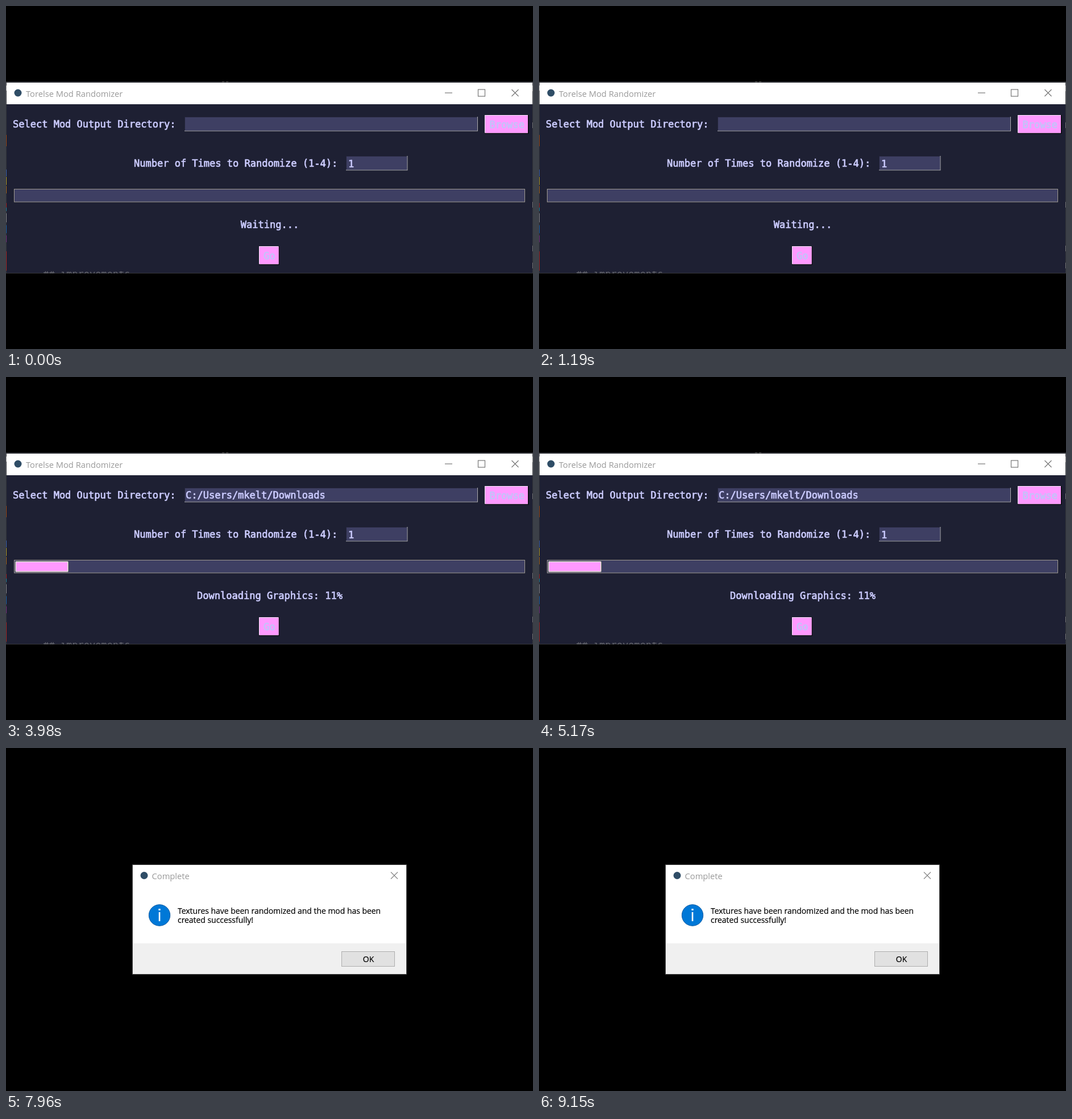
These frames come from a looping animation (927x604 px, 9.95 s). An HTML page:

```html
<!DOCTYPE html>
<html lang="en">
<head>
<meta charset="utf-8">
<title>Mod randomizer</title>
<style>
html, body { margin: 0; width: 100%; height: 100%; overflow: hidden; background: #000; }
svg { display: block; width: 927px; height: 604px; }
text { font-family: "Open Sans", "Noto Sans", sans-serif; font-size: 14.3px; white-space: pre; }
.scene { display: none; }
.title { font-size: 14.7px; fill: #999; }
.mono text { font-family: "DejaVu Sans Mono", monospace; font-size: 17px; fill: #ccccff; stroke: #ccccff; stroke-width: .7; }
.mono .label { fill: #c6c0fa; stroke: #c6c0fa; stroke-width: 1; }
.line { fill: none; stroke-width: 1.2; }
.white text { fill: #fff; stroke: #fff; stroke-width: .25; }
.white .dim { fill: #8e8e8e; stroke: none; }
.white .head { fill: #e4e4e4; stroke: none; }
.message text { font-size: 13.93px; fill: #000; stroke: #000; stroke-width: .2; }
.message .title { font-size: 14.7px; fill: #999; stroke: none; }
.mid { text-anchor: middle; }
</style>
</head>
<body>
<svg viewBox="0 0 927 604">
  <defs>
    <linearGradient id="sky" x2="1" y2="1">
      <stop stop-color="#1688dd"/><stop offset="1" stop-color="#4cc3ff"/>
    </linearGradient>
    <clipPath id="underMain"><rect x="60" y="467" width="180" height="4"/></clipPath>
    <clipPath id="underPicker"><rect x="65" y="602" width="797" height="2"/></clipPath>
    <path id="cross" class="line" d="M-6-6L6 6M6-6L-6 6"/>
    <path id="down" d="M-4-10H4V0H9.500L0 9.500L-9.500 0H-4Z" fill="#3a9ae8"/>
    <g id="pin" fill="#a3adb8" transform="rotate(45)">
      <path d="M-3-6H3V-4L2-3V1L4.500 3V4H-4.500V3L-2 1V-3L-3-4Z"/>
      <path d="M-.6 4H.6V8H-.6Z"/>
    </g>
    <g id="monitor">
      <rect x="-10" y="-9" width="20" height="14" fill="url(#sky)" stroke="#b9dff5" stroke-width=".8"/>
      <path d="M-2 5H2V7H9V9.500H-9V7H-2Z" fill="#b9c4cc"/>
    </g>
  </defs>

  <g class="scene" id="main">
    <rect y="133" width="927" height="338" fill="#34353a"/>
    <g id="edge"></g>
    <rect x="1" y="135" width="925" height="38" fill="#fff"/>
    <rect x="1" y="173" width="925" height="297" fill="#1e2033"/>
    <path d="M380 133.500H391" stroke="#777" stroke-dasharray="4 3"/>
    <g class="mono" clip-path="url(#underMain)"><text x="65" y="478" style="fill:#62636c;stroke:none">## improvements</text></g>
    <circle cx="21" cy="153" r="6.500" fill="#2f4d66"/>
    <text class="title" x="35" y="160">Torelse Mod Randomizer</text>
    <g class="line" stroke="#777">
      <path d="M772 153H785"/>
      <rect x="830.500" y="147" width="12" height="12"/>
      <use href="#cross" x="895.500" y="153"/>
    </g>
    <g id="widgets"></g>
    <rect x="14.500" y="322.500" width="898" height="22.500" fill="#3e3f63" stroke="#9e9a91"/>
    <g id="bar">
      <rect id="barEdge" x="16.500" y="324.700" height="18.500" rx="1.500" fill="#9e9a91" stroke="#9e9a91"/>
      <rect id="barFace" x="17.500" y="325.700" height="16.500" fill="#ff99ff" stroke="#eeebe7"/>
    </g>
    <g class="mono">
      <text x="12" y="214">Select Mod Output Directory:</text>
      <text id="path" x="316" y="214"></text>
      <text x="225" y="283">Number of Times to Randomize (1-4):</text>
      <text x="602" y="283.500">1</text>
      <text id="status" class="mid" x="464" y="390.500"></text>
      <text class="label" x="850.500" y="215">Browse</text>
      <text class="label" x="453" y="446">Go</text>
    </g>
  </g>

  <g class="scene white" id="picker">
    <rect x="64" width="799" height="604" fill="#303036"/>
    <rect x="65" width="797" height="40" fill="#2b2b2b"/>
    <rect x="65" y="40" width="797" height="467" fill="#191919"/>
    <rect x="65" y="84" width="797" height="39" fill="#202020"/>
    <rect x="268" y="123" width="594" height="384" fill="#202020"/>
    <path d="M267.500 124V507" stroke="#2b2b2b"/>
    <rect x="65" y="507" width="797" height="95" fill="#383838"/>
    <rect x="65" y="602" width="797" height="2" fill="#161719"/>
    <g clip-path="url(#underPicker)">
      <text class="dim" x="122" y="612">To install</text>
      <text class="dim" x="553" y="612">the latest build before the folder is loaded</text>
    </g>

    <circle cx="86" cy="20" r="6" fill="#3588c4"/>
    <text class="title dim" x="99" y="26">Select Folder</text>
    <use href="#cross" x="840.500" y="19.500" stroke="#999"/>

    <g class="line" stroke="#999" style="stroke-width:2">
      <path d="M97 61H83M89 55L83 61L89 67M120 61H134M128 55L134 61L128 67"/>
      <path d="M154 59L157.500 62.500L161 59" stroke-width="1.500"/>
      <path d="M183.500 68V55M177.500 61L183.500 55L189.500 61" stroke="#fff"/>
    </g>
    <g class="line" stroke="#575757">
      <rect x="201.500" y="48.500" width="371" height="26"/>
      <rect x="589.500" y="48.500" width="256" height="26"/>
    </g>
    <use href="#down" x="214.500" y="61"/>
    <g class="line" stroke="#aaa" style="stroke-width:1.600">
      <path d="M235 58L238.500 61.500L235 65M313 58L316.500 61.500L313 65"/>
      <path d="M530 60L535 65L540 60"/>
      <path d="M563 57A5.300 5.300 0 1 0 565.500 61M560 55V59.500H564.500"/>
      <circle cx="829.500" cy="60" r="4.500"/><path d="M826 63.500L820.500 69"/>
    </g>
    <text x="251.500" y="66">This PC</text>
    <text x="330.500" y="66">Downloads</text>
    <text class="dim" x="600" y="66">Search Downloads</text>

    <text x="88" y="108.500">Organize</text>
    <path d="M155 101H166L160.500 107ZM774 101H785L779.500 107Z" fill="#ddd"/>
    <text x="204" y="108.500">New folder</text>
    <g stroke="#ccc">
      <path d="M742 97H748M742 103H748M742 109H748" stroke-width="4"/>
      <path d="M750 97H755M757 97H762M750 103H755M757 103H762M750 109H755M757 109H762" stroke="#999"/>
    </g>
    <circle cx="832.500" cy="103.500" r="9.500" fill="#0a66c2"/>
    <text class="mid" x="832.500" y="109" style="font-weight:700">?</text>

    <text class="head" x="291" y="145.500">Name</text>
    <text class="head" x="624.500" y="145.500">Date modified</text>
    <text class="head" x="808.500" y="145.500">Type</text>
    <path d="M615.500 124V156M799.500 124V156" stroke="#636363"/>
    <path class="line" d="M703.500 125L708 129.500L712.500 125" stroke="#888"/>
    <text x="468.500" y="190">No items match your search.</text>

    <rect x="66" y="350" width="197" height="28" fill="#333"/>
    <g id="places"></g>
    <path d="M107.500 151L109.500 157L115.500 157L111 161L113 167L107.500 163.500L101 167L103.500 161L99 157.500L105 157Z" fill="#2f9bec"/>
    <rect x="106.500" y="182.500" width="19" height="15" fill="url(#sky)" stroke="#2f9fe8"/>
    <path d="M108 195.500H118" stroke="#bfe7ff"/>
    <use href="#down" x="116" y="220.500"/>
    <path d="M108 242H120L124 246V262H108Z" fill="#eef2f5"/>
    <path d="M111 246H117M111 249.500H121M111 253H121M111 256.500H121M111 259.500H118" stroke="#3387c4" stroke-width="1.500"/>
    <rect x="106.500" y="275.500" width="19" height="14" fill="#eef2f5" stroke="#c5ccd2"/>
    <rect x="108" y="277" width="16" height="11" fill="#7fc3ec"/>
    <path d="M108 288V283L113 281L118 285L124 284V288Z" fill="#2f5c70"/>
    <circle cx="107" cy="323" r="8" fill="#1683d8"/>
    <circle cx="94" cy="328" r="6.500" fill="#d9182d"/>
    <path d="M91.500 325.500L96.500 330.500M96.500 325.500L91.500 330.500" stroke="#fff" stroke-width="1.500"/>
    <use href="#monitor" x="106" y="364"/>
    <use href="#monitor" transform="translate(103 407) scale(.75)"/>
    <circle cx="110" cy="401" r="6.500" fill="#73bde9"/>
    <path class="line" d="M104 400H116M110 395Q106 401 110 407" stroke="#2676ad"/>

    <rect x="270" y="486" width="592" height="20" fill="#171717"/>
    <rect x="291" y="486" width="407.500" height="20" fill="#4d4d4d"/>
    <path class="line" d="M283 492L277.500 496.500L283 501M848 492L853.500 496.500L848 501" stroke="#999" style="stroke-width:1.800"/>

    <text x="277" y="538.500" text-anchor="end">Folder:</text>
    <rect class="line" x="283.500" y="518.500" width="556" height="29" stroke="#9b9b9b"/>
    <g fill="#333" stroke="#f0f0f0" stroke-width="1.700">
      <rect x="576.500" y="555" width="135.500" height="31.500"/>
      <rect x="728.500" y="555" width="111" height="31.500"/>
    </g>
    <text class="mid" x="644.500" y="576">Select Folder</text>
    <text class="mid" x="784" y="576">Cancel</text>
    <path d="M856 591H858M852 595H858M848 599H858" stroke="#bbb" stroke-width="2" stroke-dasharray="2"/>
  </g>

  <g class="scene message" id="done">
    <rect x="222.500" y="205.500" width="482" height="193" fill="#fff" stroke="#4a4a4a"/>
    <rect x="223" y="344" width="481" height="54" fill="#f0f0f0"/>
    <circle cx="243" cy="224.500" r="6.500" fill="#2f4d66"/>
    <text class="title" x="256.500" y="231">Complete</text>
    <use href="#cross" x="683" y="224.500" stroke="#888"/>
    <circle cx="270" cy="294.500" r="18.700" fill="#0078d7" stroke="#0b5ca3"/>
    <path d="M268.700 289H271.300V305H268.700ZM268.400 283H271.600V286H268.400Z" fill="#fff"/>
    <text x="302" y="292">Textures have been randomized and the mod has been</text>
    <text x="302" y="308">created successfully!</text>
    <rect x="590.500" y="358.500" width="93" height="26" fill="#e1e1e1" stroke="#adadad"/>
    <text class="mid" x="637.500" y="377">OK</text>
  </g>
</svg>
<script>
const $ = id => document.getElementById(id);

function add(parent, tag, attrs, content = '') {
  const el = document.createElementNS('http://www.w3.org/2000/svg', tag);
  for (const key in attrs) el.setAttribute(key, attrs[key]);
  el.textContent = content;
  $(parent).append(el);
}

function rect(parent, x, y, width, height, fill) {
  add(parent, 'rect', { x, y, width, height, fill });
}

// Beveled box: light and dark sides around a face.
function bevel(x, y, w, h, near, far, face, depth) {
  rect('widgets', x, y, w, h, far);
  rect('widgets', x, y, w - depth, h - depth, near);
  rect('widgets', x + 1, y + 1, w - 1 - depth, h - 1 - depth, face);
}

const entry = (x, y, w) => bevel(x, y, w, 25.5, '#24253a', '#aaa9ad', '#3e3f63', 1.2);
const button = (x, y, w) => bevel(x, y, w, 33, '#ffe6ff', '#08080c', '#ff99ff', 1.5);
entry(314, 195, 516);
entry(598, 264, 108.5);
button(842, 192, 77.5);
button(445, 423, 36);

// Slivers of the desktop showing beside the window.
[[140, 9, '#999'], [227, 20, '#9b4a16'], [288, 12, '#3d65ad'], [301, 14, '#b29b25'],
 [317, 13, '#a5671c'], [347, 8, '#a32825'], [355, 6, '#20869a'], [365, 16, '#888'],
 [386, 14, '#1e66a8'], [404, 12, '#7a347f'], [432, 34, '#a62a25']
].forEach(([y, h, color]) => rect('edge', 0, y, 1, h, color));
[140, 205, 345, 422, 452].forEach(y => rect('edge', 926, y, 1, 10, '#777'));

[['Quick access', 122.5, 164.5], ['Desktop', 132.5, 195, 1], ['Downloads', 132.5, 226, 1],
 ['Documents', 132.5, 256.5, 1], ['Pictures', 132.5, 287, 1], ['MistNook - Personal', 122.5, 328],
 ['This PC', 122.5, 369], ['Network', 122.5, 409.5]
].forEach(([name, x, y, pinned]) => {
  add('places', 'text', { x, y }, name);
  if (pinned) add('places', 'use', { href: '#pin', x: 253.5, y: y - 5 });
});

const folder = 'C:/Users/mkelt/Downloads';
const hold = 1990;
const steps = [
  { scene: 'main', path: '', end: 0, status: 'Waiting...' },
  { scene: 'picker' },
  { scene: 'main', path: folder, end: 109.5, status: 'Downloading Graphics: 11%' },
  { scene: 'main', path: folder, end: 605, status: 'Randomizing Graphics...' },
  { scene: 'done' }
];
let shown = -1;

function show(step) {
  for (const scene of document.querySelectorAll('.scene'))
    scene.style.display = scene.id === step.scene ? 'inline' : 'none';
  if (step.scene !== 'main') return;
  $('path').textContent = step.path;
  $('status').textContent = step.status;
  $('bar').style.display = step.end ? 'inline' : 'none';
  $('barEdge').setAttribute('width', Math.max(0, step.end - 16.5));
  $('barFace').setAttribute('width', Math.max(0, step.end - 18.5));
}

let start;
function tick(now) {
  start ??= now;
  const index = Math.floor(Math.max(0, now - start) / hold) % steps.length;
  if (index !== shown) show(steps[shown = index]);
  requestAnimationFrame(tick);
}
show(steps[0]);
requestAnimationFrame(tick);
</script>
</body>
</html>
```
